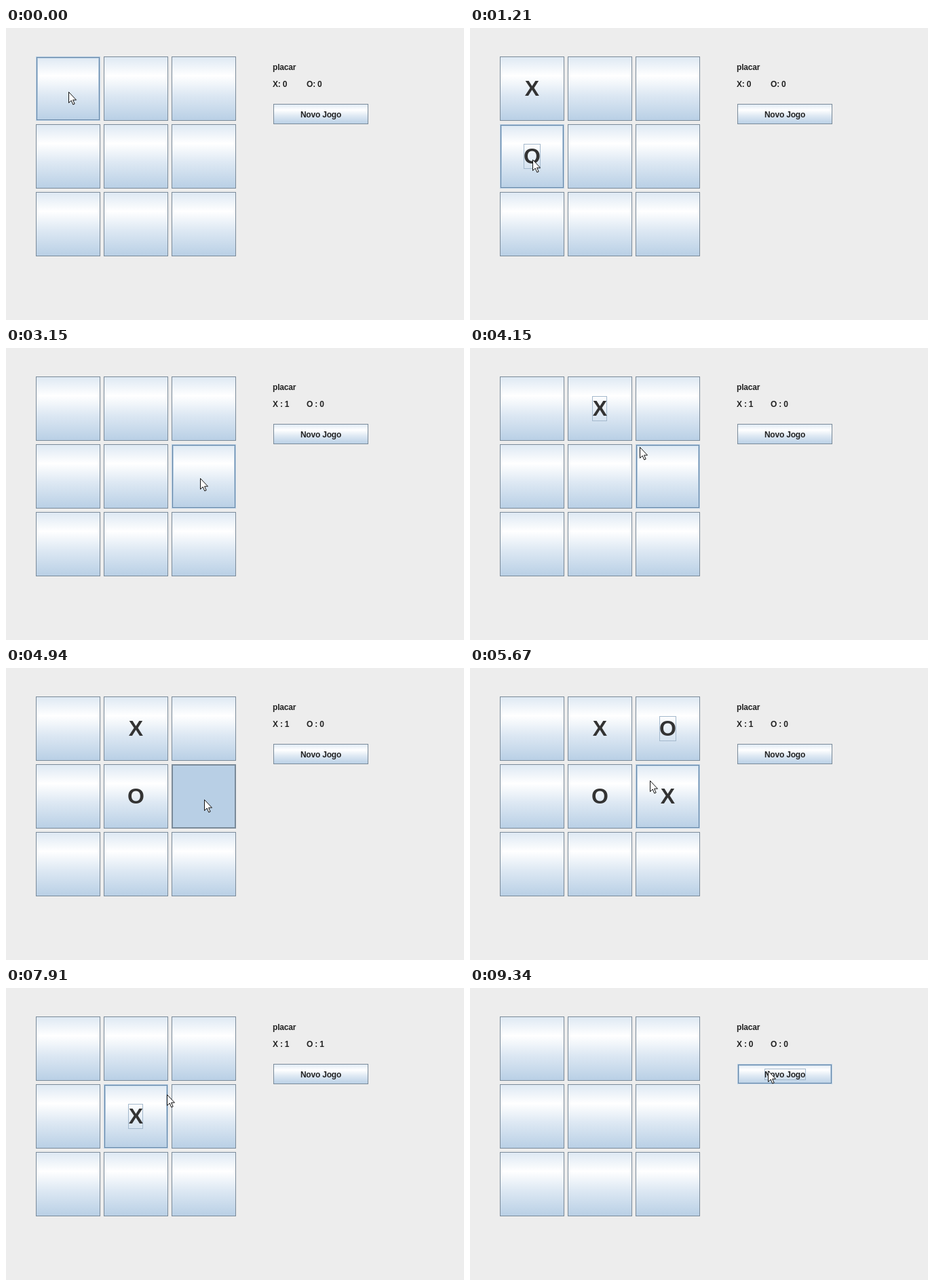
An HTML page for the animation above (9410 ms loop, 675 by 431 pixels).

```html
<!DOCTYPE html>
<html lang="pt">
<head>
<meta charset="utf-8">
<title>Jogo da velha</title>
<style>
html, body { margin: 0; width: 100%; height: 100%; overflow: hidden; background: #ededed; }
svg { display: block; width: 675px; height: 431px; }
rect { shape-rendering: crispEdges; }
text { font: bold 12px "Liberation Sans", Arial, sans-serif; letter-spacing: -.2px; fill: #222; white-space: pre; }
.mid { text-anchor: middle; }
.mark { font-size: 32px; letter-spacing: 0; fill: #333; }
.title { font: bold 10.3px "DejaVu Sans", sans-serif; letter-spacing: 0; fill: #fff; }
</style>
</head>
<body>
<svg id="stage" viewBox="0 0 675 431">
  <defs>
    <linearGradient id="ocean" x2="0" y2="1">
      <stop offset="0" stop-color="#dde8f3"/>
      <stop offset=".3" stop-color="#fff"/>
      <stop offset=".6" stop-color="#dde8f3"/>
      <stop offset="1" stop-color="#b8cfe5"/>
    </linearGradient>
    <linearGradient id="bar">
      <stop offset="0" stop-color="#0a246a"/>
      <stop offset="1" stop-color="#a6caf0"/>
    </linearGradient>
  </defs>
</svg>
<script>
const LOOP = 9410, PRESS = 100, SETTLE = 40;
const DARK = '#7a8a99', LIGHT = '#b8cfe5', RING = '#6787a6', PAPER = '#ededed';
const stage = document.getElementById('stage');

// [time, button] clicks, [time, x, y] steers the pointer
const STEPS = [
  [370, 0], [770, 92, 94], [1080, 3], [1450, 4], [1750, 7], [2160, 253, 272], [2360, 8], [2850, 'ok'],
  [3430, 1], [4150, 250, 146], [4520, 4], [4940, 5], [5390, 2], [5670, 265, 166], [5990, 7], [6440, 6],
  [6730, 124, 271], [7170, 338, 246], [7370, 'ok'],
  [7710, 4], [7910, 237, 157], [8170, 1], [8530, 2], [9110, 'new'], [9340, 439, 122]
];
const CLICKS = STEPS.filter(s => s.length === 2);
const LINES = ['012', '345', '678', '036', '147', '258', '048', '246'];

function el(name, attrs, parent = stage, text = '') {
  const node = document.createElementNS('http://www.w3.org/2000/svg', name);
  for (const key in attrs) node.setAttribute(key, attrs[key]);
  node.textContent = text;
  parent.appendChild(node);
  return node;
}

const box = (x, y, width, height, fill, parent) => el('rect', { x, y, width, height, fill }, parent);

const frame = (x, y, w, h, stroke, parent) =>
  el('rect', { x: x + .5, y: y + .5, width: w - 1, height: h - 1, fill: 'none', stroke }, parent);

const label = (x, y, text, cls = '', parent = stage) => el('text', { x, y, class: cls }, parent, text);

function show(node, on) { node.style.display = on ? '' : 'none'; }

// raised box with light upper left and dark lower right edges
function bevel(x, y, w, h, [outer, inner], parent) {
  box(x, y, w, h, '#404040', parent);
  box(x, y, w - 1, h - 1, outer, parent);
  box(x + 1, y + 1, w - 2, h - 2, '#808080', parent);
  box(x + 1, y + 1, w - 3, h - 3, inner, parent);
}

function makeButton(x, y, w, h, aim, parent) {
  const face = box(x, y, w, h, 'url(#ocean)', parent);
  const rings = [0, 1, 2].map(i => frame(x + i, y + i, w - 2 * i, h - 2 * i, DARK, parent));
  return { x, y, w, h, face, rings, aim: [x + aim[0], y + aim[1]] };
}

function paintButton(b, hover, pressed, focused, bold) {
  const colors = pressed || bold ? [DARK, DARK, 'none'] : hover ? [LIGHT, RING, LIGHT] : [DARK, 'none', 'none'];
  b.rings.forEach((r, i) => r.setAttribute('stroke', colors[i]));
  b.face.setAttribute('fill', pressed ? LIGHT : 'url(#ocean)');
  show(b.focus, focused);
}

const buttons = {};
const cells = Array.from({ length: 9 }, (_, i) => {
  const x = 44 + i % 3 * 100, y = 42 + Math.floor(i / 3) * 100;
  const b = buttons[i] = makeButton(x, y, 95, 95, [48, 52]);
  b.focus = frame(x, y + 29, 22, 37, '#a3b8cc');
  b.text = label(x + 47.5, y + 58, '', 'mid mark');
  return b;
});

label(393, 62, 'placar');
const scoreX = label(393, 87, ''), scoreO = label(443, 87, '');
const again = buttons.new = makeButton(394, 112, 140, 30, [45, 8]);
again.focus = frame(434, 119, 61, 17, '#a3b8cc');
label(464, 132, 'Novo Jogo', 'mid');

// message window
const dialog = el('g', {});
bevel(206, 161, 268, 115, ['#d4d0c8', '#fff'], dialog);
box(208, 163, 264, 111, '#d4d0c8', dialog);
box(209, 183, 262, 90, PAPER, dialog);
box(209, 164, 262, 18, 'url(#bar)', dialog);
label(210, 177, 'Mensagem', 'title', dialog);
bevel(453, 166, 16, 14, ['#fff', '#d4d0c8'], dialog);
el('path', { d: 'M457.5 169.5l6.5 6.5m0-6.5l-6.5 6.5', stroke: '#000', 'stroke-width': 1.5 }, dialog);
el('circle', { cx: 236, cy: 209, r: 12.5, fill: '#c0c0c0' }, dialog);
el('circle', { cx: 233, cy: 206, r: 12.5, fill: '#c8cdfa', stroke: '#777ba6' }, dialog);
el('path', { d: 'M231.5 199h3v3h-3zM230.5 204h4v8h1v1h-5v-1h1v-7h-1z', fill: '#5d6190' }, dialog);
const verdict = label(265, 214, '', '', dialog);
const ok = buttons.ok = makeButton(320, 234, 39, 26, [18, 12], dialog);
ok.focus = frame(330, 238, 19, 19, '#a3b8cc', dialog);
label(339.5, 252, 'OK', 'mid', dialog);

const pointer = el('path', {
  d: 'M.5.5V16.5L4.2 13 6.8 19 9.2 18 6.6 12.2H11.5Z', fill: '#fff', stroke: '#111'
});

// the pointer rests around each click
const stops = STEPS.flatMap(([t, a, b]) => {
  if (b !== undefined) return [[t, a, b]];
  const aim = buttons[a].aim;
  return [[t - SETTLE, ...aim], [t + PRESS + SETTLE, ...aim]];
});
stops.unshift([0, ...stops[0].slice(1)]);
stops.push([LOOP, ...stops[stops.length - 1].slice(1)]);

const same = (p, q) => p[1] === q[1] && p[2] === q[2];

// velocity is zero next to a rest
function slope(i, k) {
  const p = stops[i - 1], q = stops[i], r = stops[i + 1];
  if (!p || !r || same(p, q) || same(q, r)) return 0;
  return (r[k] - p[k]) / (r[0] - p[0]);
}

function pointerAt(t) {
  const i = stops.findIndex(s => s[0] > t) - 1;
  const a = stops[i], b = stops[i + 1], d = b[0] - a[0];
  const u = (t - a[0]) / d, v = 1 - u;
  return [1, 2].map(k => Math.round(
    v * v * (1 + 2 * u) * a[k] + u * u * (3 - 2 * u) * b[k] +
    u * v * d * (v * slope(i, k) - u * slope(i + 1, k))));
}

const inside = (b, [x, y]) => x >= b.x && x < b.x + b.w && y >= b.y && y < b.y + b.h;

// replay the clicks up to time t
function gameAt(t) {
  const s = { X: 0, O: 0, gap: '' };
  const clear = () => Object.assign(s, { board: Array(9).fill(''), turn: 'X', winner: '' });
  clear();
  for (const [down, target] of CLICKS) {
    if (t < down) break;
    s.focus = target;
    if (t < down + PRESS) {
      s.pressed = target;
      break;
    }
    if (target === 'ok') {
      s[s.winner]++;
      s.gap = ' ';
      clear();
    } else if (target === 'new') {
      s.X = s.O = 0;
      clear();
    } else {
      s.board[target] = s.turn;
      if (LINES.some(l => [...l].every(c => s.board[c] === s.turn))) {
        s.winner = s.turn;
        s.opened = down + PRESS;
      }
      s.turn = s.turn === 'X' ? 'O' : 'X';
    }
  }
  return s;
}

function draw(t) {
  const s = gameAt(t), pos = pointerAt(t);
  const over = s.winner ? pointerAt(s.opened) : pos;
  cells.forEach((b, i) => {
    const mark = s.board[i], wide = mark === 'O';
    b.text.textContent = mark;
    b.focus.setAttribute('x', b.x + (wide ? 35.5 : 36.5));
    b.focus.setAttribute('width', wide ? 24 : 21);
    paintButton(b, inside(b, over), s.pressed === i, mark && s.focus === i && !s.winner);
  });
  paintButton(again, inside(again, over), s.pressed === 'new', s.focus === 'new');
  paintButton(ok, false, s.pressed === 'ok', true, true);
  scoreX.textContent = `X${s.gap}: ${s.X}`;
  scoreO.textContent = `O${s.gap}: ${s.O}`;
  verdict.textContent = `${s.winner} ganhou`;
  show(dialog, s.winner);
  pointer.setAttribute('transform', `translate(${pos})`);
}

const start = performance.now();
function tick() {
  draw((performance.now() - start) % LOOP);
  requestAnimationFrame(tick);
}
tick();
</script>
</body>
</html>
```
